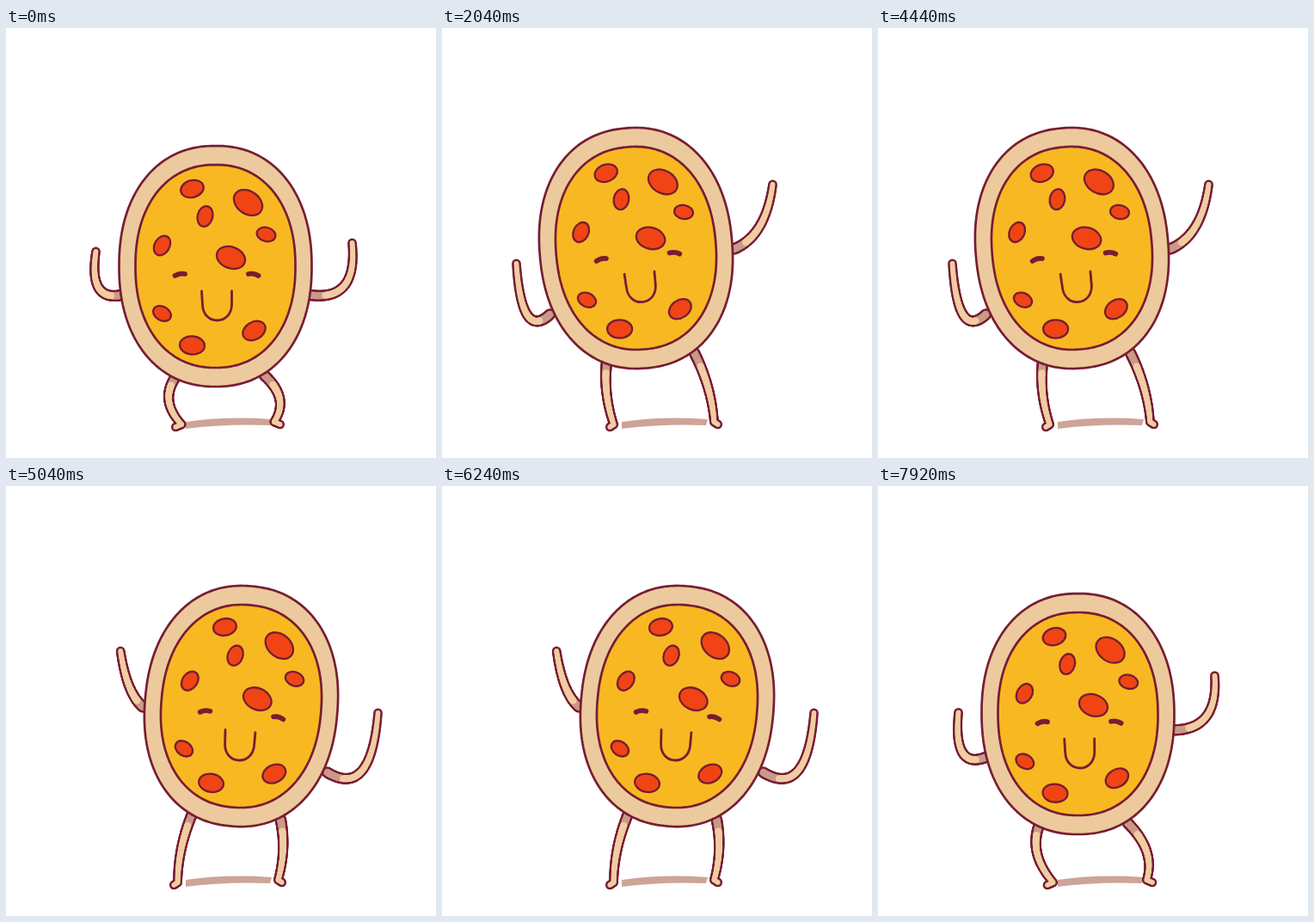
An HTML page with a canvas for the animation above (8 s loop, 500x500 px).

```html
<!DOCTYPE html>
<html lang="en">
<head>
<meta charset="utf-8">
<title>Dancing pizza</title>
<style>
  html, body { margin: 0; width: 100%; height: 100%; overflow: hidden; background: #fff; }
  canvas { display: block; }
</style>
</head>
<body>
<canvas id="stage" width="500" height="500"></canvas>
<script>
const ctx = document.getElementById('stage').getContext('2d');
const INK = '#771d33', CRUST = '#ecca9d', CHEESE = '#f8b822', PEPPERONI = '#f04415';
const SKIN = '#f0cda2', SHADE = '#c99a88', SHADOW = '#cda498';
const LOOP = 8000, STEP = 120;
const LEFT = -1, RIGHT = 1;

// One hop to the side: crouch, rise, stretch, two steps down. The next hop mirrors it.
const hop = [
  { sway: -6, lift: 0, lean: 0 },
  { sway: 17, lift: 12, lean: 0.4 },
  { sway: 24, lift: 21, lean: 1 },
  { sway: 17, lift: 10, lean: 0.6 },
  { sway: 11, lift: 2, lean: 0.2 }
];

// Toppings around the pizza's centre: x, y, radius, tilt in degrees.
const toppings = [
  [-27, -90, 13.5, -15], [38, -74, 18, 35], [-12, -58, 12, -75],
  [-62, -24, 12, -60], [59, -37, 11, 15], [18, -10, 17, 20],
  [-62, 55, 11, 30], [-27, 92, 14.5, 5], [45, 75, 14, -30]
];

function poseAt(time) {
  const beat = Math.floor(time % LOOP / STEP) % (2 * hop.length);
  const side = beat < hop.length ? RIGHT : LEFT;
  const { sway, lift, lean } = hop[beat % hop.length];
  return {
    x: 249.5 + side * sway,
    y: 277 - lift,
    lean: side * lean,
    angle: side * lean ** 3 * 5 * Math.PI / 180,
    bend: 24 * Math.sqrt(1 - (lift / 22) ** 3),
    fling: 55 * Math.max(0, Math.cos((beat - 3.6) * Math.PI / 5)) ** 6
  };
}

function stroke(width) {
  ctx.strokeStyle = INK;
  ctx.lineWidth = width;
  ctx.stroke();
}

function superellipse(rx, ry, fill) {
  const round = v => Math.sign(v) * Math.abs(v) ** (2 / 2.2);
  ctx.beginPath();
  for (let a = 0; a < 2 * Math.PI; a += 0.03) ctx.lineTo(rx * round(Math.cos(a)), ry * round(Math.sin(a)));
  ctx.closePath();
  ctx.fillStyle = fill;
  ctx.fill();
  stroke(2.7);
}

function dot(x, y, r, color) {
  ctx.fillStyle = color;
  ctx.beginPath();
  ctx.arc(x, y, r, 0, 7);
  ctx.fill();
}

// A tapered tube along a quadratic curve, with an optional toe past its end.
function limb([a, c, b], toe) {
  const discs = [];
  for (let t = 0; t <= 1; t += 1 / 70) {
    const on = k => (1 - t) ** 2 * a[k] + 2 * t * (1 - t) * c[k] + t * t * b[k];
    discs.push([on(0), on(1), 6.8 - 1.4 * t, t < 0.2 ? SHADE : SKIN]);
  }
  if (toe) {
    for (let t = 0; t <= 1; t += 0.1) discs.push([b[0] + toe[0] * t, b[1] + toe[1] * t, 5.2, SKIN]);
  }
  discs.forEach(([x, y, r]) => dot(x, y, r, INK));
  discs.forEach(([x, y, r, color]) => dot(x, y, r - 2.5, color));
}

// The arm on the side of the lean drops, the other one rises.
function arm(p, side) {
  const drop = p.lean * side, curve = drop * drop;
  const at = (out, down) => [p.x + side * out, p.y + down];
  limb([
    at(107 - 7 * drop, 33 + 38 * drop + 6 * curve),
    at(157 + 9 * side - 15 * curve, 43 + 61 * drop + 4 * curve),
    at(149 + 10 * side + (side === LEFT ? p.fling : 0), -22 - 5 * side + 41 * drop - 6 * curve)
  ]);
}

function leg(p, side) {
  const x = 6 + side * 51, y = 127;
  const cos = Math.cos(p.angle), sin = Math.sin(p.angle);
  const hip = [p.x + x * cos - y * sin, p.y + x * sin + y * cos];
  const ankle = [258 + side * (61 - 0.3 * p.bend), 459.5 - 1.5 * side];
  const knee = [(hip[0] + ankle[0]) / 2 + side * p.bend, (hip[1] + ankle[1]) / 2];
  limb([hip, knee, ankle], [side * (3 + p.bend * 0.17), 3]);
}

function shadow() {
  ctx.fillStyle = SHADOW;
  ctx.beginPath();
  ctx.moveTo(209, 458);
  ctx.quadraticCurveTo(258, 451, 309, 455);
  ctx.lineTo(307, 462);
  ctx.quadraticCurveTo(255, 460, 209, 466);
  ctx.fill();
}

function face() {
  ctx.lineCap = 'round';
  ctx.beginPath();
  for (const side of [LEFT, RIGHT]) {
    ctx.moveTo(1.5 + side * 48.5, 11);
    ctx.quadraticCurveTo(1.5 + side * 43, 7.5, 1.5 + side * 37, 9);
  }
  stroke(5.8);
  ctx.beginPath();
  ctx.moveTo(-16, 29);
  ctx.lineTo(-15, 45);
  ctx.bezierCurveTo(-14, 69, 18, 69, 19, 45);
  ctx.lineTo(19, 29);
  stroke(2.8);
}

function body(p) {
  ctx.save();
  ctx.translate(p.x, p.y);
  ctx.rotate(p.angle);
  superellipse(112, 140, CRUST);
  superellipse(93, 118, CHEESE);
  ctx.fillStyle = PEPPERONI;
  for (const [x, y, r, tilt] of toppings) {
    ctx.beginPath();
    ctx.ellipse(x, y, r, r * 0.73, tilt * Math.PI / 180, 0, 7);
    ctx.fill();
    stroke(2.3);
  }
  face();
  ctx.restore();
}

function draw(time) {
  const p = poseAt(time);
  ctx.fillStyle = '#fff';
  ctx.fillRect(0, 0, 500, 500);
  shadow();
  for (const side of [LEFT, RIGHT]) {
    leg(p, side);
    arm(p, side);
  }
  body(p);
}

let start;
function tick(now) {
  start ??= now;
  draw(now - start);
  requestAnimationFrame(tick);
}
draw(0);
requestAnimationFrame(tick);
</script>
</body>
</html>
```
